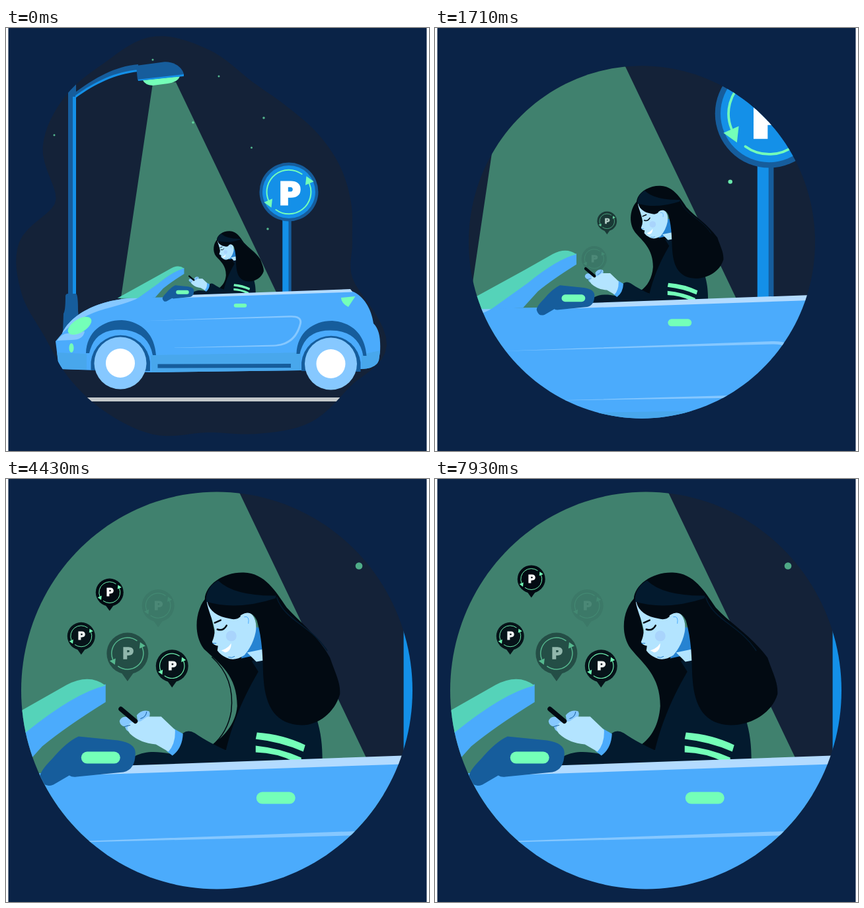
Recreate the animation shown at these times as an HTML page. Size 640 by 640 pixels, loop 8000 ms.

```html
<!DOCTYPE html>
<html lang="en">
<head>
<meta charset="utf-8">
<title>Night parking</title>
<style>
html, body { margin: 0; width: 100%; height: 100%; overflow: hidden; background: #0a2347; }
svg { display: block; width: 100%; height: 100%; }
text { font: bold 45.8px "DejaVu Sans", Inter, sans-serif; text-anchor: middle; fill: #fff; stroke: #fff; stroke-width: 3; }
.night { fill: #142238; }
.beam { fill: #40816e; }
.deep { fill: #165d9c; }
.vivid { fill: #1490e8; }
.body { fill: #4babfc; }
.low { fill: #48a7ec; }
.soft { fill: #86c8ff; }
.rim { fill: #b3dbff; }
.mint { fill: #74ffb8; }
.teal { fill: #55d3b9; }
.ink { fill: #020a12; }
.coat { fill: #031a2e; }
.skin { fill: #b3e4ff; }
.line { fill: none; stroke-linecap: round; }
</style>
</head>
<body>
<svg viewBox="0 0 640 640" xmlns="http://www.w3.org/2000/svg">
  <defs>
    <clipPath id="clip"><path id="mask"/></clipPath>
    <g id="ring">
      <g id="half">
        <path class="line" stroke="#74ffb8" stroke-width="2" d="M31 -12.5A33.4 33.4 0 0 1 -19.6 27"/>
        <path class="mint" d="M26.5 -23.7L37.6 -15.8L25 -10.3Z"/>
      </g>
      <use href="#half" transform="rotate(180)"/>
    </g>
    <text id="letter" x="1.2" y="19.1">P</text>
    <g id="wheel">
      <path class="deep" d="M121 492C122 460 146 442 175 442C207 444 225 465 227 495L222 495Q216 462 182 457Q142 453 130 480Q127 487 126 492Z"/>
      <path class="deep" d="M128.5 518V505A45 45 0 0 1 218 505V519Z"/>
      <circle class="soft" cx="173" cy="507" r="39.5"/>
      <circle fill="#fff" cx="173" cy="507" r="22"/>
    </g>
  </defs>
  <rect width="640" height="640" fill="#0a2347"/>
  <g clip-path="url(#clip)">
    <rect class="night" width="640" height="640"/>
    <g id="lamp">
      <path class="beam" d="M222 84L257 82L433 450L167.7 450Z"/>
      <path class="deep" d="M94 97L106 84V403H94Z"/>
      <path class="vivid" d="M101 104H106V403H101Z"/>
      <path class="deep" d="M90 406Q90 402 94 402H106Q109 403 109 428L113 462H86L87 432Q90 428 90 406Z"/>
      <path class="deep" d="M104 98C135 75 165 58 200 55V65C165 69 135 82 104 103Z"/>
      <path class="vivid" d="M105 102C135 81 165 66 200 63V66C165 70 135 84 105 106Z"/>
      <path class="mint" d="M207 79L263 73Q260 82 245 84L222 87Q210 86 207 79Z"/>
      <path class="vivid" d="M199 76L269 69V73L200 80Z"/>
      <path class="deep" d="M197 57L238 51.5C255 50 267 60 269 70L199 78Z"/>
    </g>
    <g id="world">
      <g id="stars" class="mint"></g>
      <path fill="#c3c8ca" d="M0 559H640V565H0Z"/>
      <path class="vivid" d="M418.3 285H428V405H418.3Z"/>
      <path class="deep" d="M427.5 285H431.7V405H427.5Z"/>
      <g transform="translate(428 248)">
        <circle class="deep" r="44.5"/>
        <circle class="vivid" r="40"/>
        <use href="#ring"/>
        <use href="#letter"/>
      </g>
      <g transform="translate(219.67 260.46) scale(.33003)">
        <g id="pins"></g>
        <path id="backHair" class="ink"/>
        <path id="strand" class="line" stroke="#020a12" stroke-width="1.5" d="M312 270C334 290 345 318 341 352C337 376 326 392 312 404"/>
        <path class="coat" d="M372 276L390 268L470 362C477 385 479 402 479 430L300 440L190 440L195 420C212 411 230 413 248 416L268 385Q276 379 286 385C302 396 318 404 333 411C341 378 354 340 382 292Z"/>
        <path class="mint" d="M380 384Q420 387 453 403L450 413Q416 398 378 394ZM378 404Q416 408 447 422V428H436Q410 415 378 414Z"/>
        <path class="body" d="M254 378L268 386Q267 408 252 419L243 412Z"/>
        <path class="soft" d="M172 367Q175 358 185 361L198 372L196 384Q183 386 180 375Q173 374 172 367ZM198 358Q206 348 217 352Q221 360 211 366L200 371Z"/>
        <path class="skin" d="M189 369L204 367L214 360L235 360L256 380Q257 401 246 413L227 402Q203 400 188 386Q180 377 189 369Z"/>
        <path class="line" stroke="#020a12" stroke-width="7" d="M174 348.5L196 367"/>
        <path class="line" stroke="#165d9c" d="M204 363Q212 361 213 353M180 375L188 373"/>
        <path fill="#2683d2" d="M372 225H388L391 266L374 268L356 272Z"/>
        <path class="skin" d="M365 263L389 258L390 275L379 277Z"/>
        <path class="skin" d="M304 186C306 200 313 212 316 229Q316 238 312 247Q314 252 321 253L320 260Q325 267 334 271Q346 277 361 267Q374 252 378 232Q382 205 360 198L315 183Z"/>
        <circle cx="341" cy="238" r="8" fill="#a9d4fc"/>
        <path class="line" stroke="#020a12" stroke-width="2.5" d="M320 228Q329 231 334 222M316 218L325 214"/>
        <path fill="#fff" d="M326 260Q336 257 341 249Q341 261 332 263Z"/>
        <path class="line" stroke="#2683d2" d="M313 249L318 249M337 270Q342 272 346 269"/>
        <path id="hair" class="ink"/>
        <path class="skin" d="M355 207Q366 199 372 209Q374 222 363 229Q354 226 355 207Z"/>
        <path class="line" stroke="#4babfc" d="M361 209Q369 207 367 219"/>
        <path class="coat" d="M321 154Q346 178 409 177L408 181Q350 200 303 186Q302 165 321 154Z"/>
        <path class="line" stroke="#031a2e" stroke-width="1.5" d="M410 180C422 215 462 222 486 260"/>
      </g>
      <path class="body" d="M75 474L85 462C95 440 128 411 200 408L270 407L524 398.5C541 405 553 425 556 447C565 456 567 470 566 490L564 503Q560 515 538 516L446 518L220 521L82 516L79 508L77 490Z"/>
      <path class="low" d="M77 491L122 493V517L82 516ZM219 495L446 491V518L220 521ZM538 494L566 488L564 503Q560 515 538 516Z"/>
      <path class="soft" d="M85 462C95 440 128 411 201 407.5Q195 413 150 425Q110 436 85 462Z"/>
      <path class="soft" d="M77 473Q85 461 95 462L119 459Q117 472 99 472Z"/>
      <ellipse class="mint" cx="111.5" cy="450.5" rx="20" ry="10" transform="rotate(-32 111.5 450.5)"/>
      <ellipse class="mint" cx="99" cy="484" rx="3.5" ry="7"/>
      <path class="mint" d="M507 408L528.5 406L518 422Q507 416 507 408Z"/>
      <path class="soft" d="M210 443.2L430 435.2Q449 434.5 447 447C441 472 426 481 405 481.7L246 484L405 479.5C424 478 438 470 444 447Q446 437 430 437.7Z"/>
      <path class="deep" d="M229.5 508.5L431 508V514L229.5 514.5Z"/>
      <use href="#wheel"/>
      <use href="#wheel" x="318.5" y="1"/>
      <path class="rim" d="M280 403.7L521 395L524.5 399.4L262 408.3Z"/>
      <g transform="translate(219.67 260.46) scale(.33003)">
        <path class="body" d="M151 311V338Q90 376 55 405L18 446L-64 450L30 382Q104 322 151 311Z"/>
        <path class="teal" d="M-155 449L23 351L92 312Q126 294 151 313Q104 324 30 384L-61 449Z"/>
        <path class="deep" d="M52 452Q50 444 70 424Q92 398 110 390L170 396Q196 400 196 415Q196 440 178 444L107 451Q100 452 96 449L72 463Q57 469 52 452Z"/>
        <rect class="mint" x="114" y="413" width="59" height="18" rx="9"/>
        <rect class="mint" x="379" y="474" width="59" height="18" rx="9"/>
      </g>
    </g>
  </g>
  <path fill="#fff" d="M0 0H3.5V640H0ZM636.5 0H640V640H636.5Z"/>
</svg>
<script>
const LOOP = 8000, CYCLE = 3500, TAU = 2 * Math.PI;
const $ = id => document.getElementById(id);
const set = (el, name, v) => el.setAttribute(name, v);
const mix = (a, b, k) => a + (b - a) * k;
const clamp = v => Math.max(0, Math.min(1, v));
const ease = k => .5 - .5 * Math.cos(Math.PI * k);
const wave = (t, peak, period) => Math.cos(TAU * (t - peak) / period);

// Radii of the opening shape, every 15 degrees clockwise from the right
const blob = [219, 229, 313, 307, 314, 300, 288, 302, 300, 294, 285, 292,
  285, 238, 288, 308, 313, 322, 292, 253, 238, 234, 231, 225];
const stars = [[222, 48], [376.5, 54], [322, 73], [390, 136], [73, 162], [283, 143], [371.5, 181], [396, 304]];

const pins = [
  { r: 24.5, x: 231, y: 234, born: 1050, life: 3440, rise: 42, sway: 9 },
  { r: 31.5, x: 196, y: 324, born: 1640, life: 3200, rise: 62, sway: 26 },
  { r: 21, x: 114, y: 254, born: 2300, life: 3440, rise: 23, sway: 0, max: .92 },
  { r: 24.5, x: 251.5, y: 299, born: 2300, life: 3440, rise: 23, sway: 0, max: .92 },
  { r: 21, x: 146, y: 203, born: 2550, life: 3440, rise: 54, sway: -11, later: { y: 152, rise: 0, sway: 0 } }
];

$('stars').innerHTML = stars.map(([x, y], i) => `<circle cx="${x}" cy="${y}" r="${i % 2 ? 1.75 : 1.5}"/>`).join('');
$('pins').innerHTML = pins.map(() => `<g><path class="ink" d="M-10 28L0 42L10 28Z"/><circle class="ink" r="31.5"/>
  <use class="spin" href="#ring"/><use href="#letter" transform="translate(0 -1.4) scale(.508)"/></g>`).join('');
const pinEls = [...$('pins').children];

// Slow start, then a quadratic stop that keeps the speed
function zoom(t) {
  const split = 2100, pow = 2.85, edge = (split / 2332) ** pow, rest = 1 - edge;
  if (t < split) return (t / 2332) ** pow;
  const k = clamp((t - split) * pow * edge / (2 * rest * split));
  return edge + rest * k * (2 - k);
}

function blobRadius(a) {
  const n = blob.length, f = a / TAU * n, i = Math.floor(f), k = f - i;
  const [o, p, q, r] = [-1, 0, 1, 2].map(j => blob[(i + j + n) % n]);
  return p + k / 2 * (q - o + k * (2 * o - 5 * p + 4 * q - r + k * (3 * (p - q) + r - o)));
}

function maskPath(t, p) {
  const round = clamp(t / 1140) ** 1.5, slide = clamp((p - .13) / .87), grow = clamp((p - .413) / .587);
  const cx = 305 + 14 * Math.sqrt(slide), cy = 324 - 4 * grow;
  const rx = 262 + 34 * grow, ry = rx + 4.5 + 6 * clamp(1 - 3 * slide);
  const pts = [];
  for (let a = 0; a < TAU - 1e-6; a += TAU / 180) {
    const r = blobRadius(a), w = mix(r, rx, round), h = mix(r, ry, round);
    pts.push((cx + w * Math.cos(a)).toFixed(2) + ' ' + (cy + h * Math.sin(a)).toFixed(2));
  }
  return `M${pts.join('L')}Z`;
}

function drawHair(t) {
  const h = .5 + .5 * wave(t, 1030, 6800), d = (h - .5) * 13, e = (1 - h) * 3, g = (1 - h) * 9;
  set($('hair'), 'd', `M301 182C302 160 330 141 360 142C392 143 408 170 425 195C449 221 ${474 + d / 2} 236 ${497 + d} 271` +
    `C${505 + d} 295 ${513 + d} 308 ${512 + d} 326C${504 + d} 354 ${476 + d / 2} 373 448 373C409 372 393 346 390 304` +
    'C388 280 390 250 380 215C375 203 365 200 358 206Q350 215 340 212C320 209 308 200 305 187Z');
  set($('backHair'), 'd', `M305 178C${284 + e} 195 ${279 + e} 235 ${297 + e} 258C${315 + g} 280 ${341 + g} 298 ${341 + g} 344` +
    `C${339 + g} 372 328 392 310 404L345 415L390 290L372 255L320 250L312 215Z`);
  set($('strand'), 'opacity', clamp((.75 - h) * 5));
}

function drawPin(el, pin, t, spin) {
  const again = t >= pin.born + CYCLE;
  const { r, x, y, born, life, rise, sway, max = 1 } = again ? { ...pin, ...pin.later } : pin;
  const u = clamp((t - born - (again ? CYCLE : 0)) / life);
  const px = x - sway * Math.sin(Math.PI * u ** 1.2), py = y - rise * ease(u);
  set(el, 'transform', `translate(${px} ${py}) scale(${r / 31.5})`);
  set(el, 'opacity', Math.min(max, u / .32, (1 - u) / .3));
  set(el.querySelector('.spin'), 'transform', `rotate(${spin}) scale(.72)`);
}

function draw(t) {
  const p = zoom(t), s = 1 + 2.03 * p, pan = -10.9 * (1 - p) * clamp(t / 1140);
  set($('world'), 'transform', `translate(${328 * (1 - s) + pan} ${389 * (1 - s)}) scale(${s})`);
  // The lamp stands further back, so it grows less
  set($('lamp'), 'transform', `translate(${230.7 - 161.2 * p ** .77} ${27.2 - 599.2 * p ** .95}) ` +
    `scale(${1 + 1.657 * p}) translate(-230.7 -27.2)`);
  set($('mask'), 'd', maskPath(t, p));
  set($('stars'), 'opacity', .8 + .2 * wave(t, 2320, 3600));
  drawHair(t);
  const spin = -180 * clamp(Math.max(0, t - 1700) % CYCLE / 2730);
  pins.forEach((pin, i) => drawPin(pinEls[i], pin, t, spin));
}

const start = performance.now();
function tick() {
  draw((performance.now() - start) % LOOP);
  requestAnimationFrame(tick);
}
tick();
</script>
</body>
</html>
```
